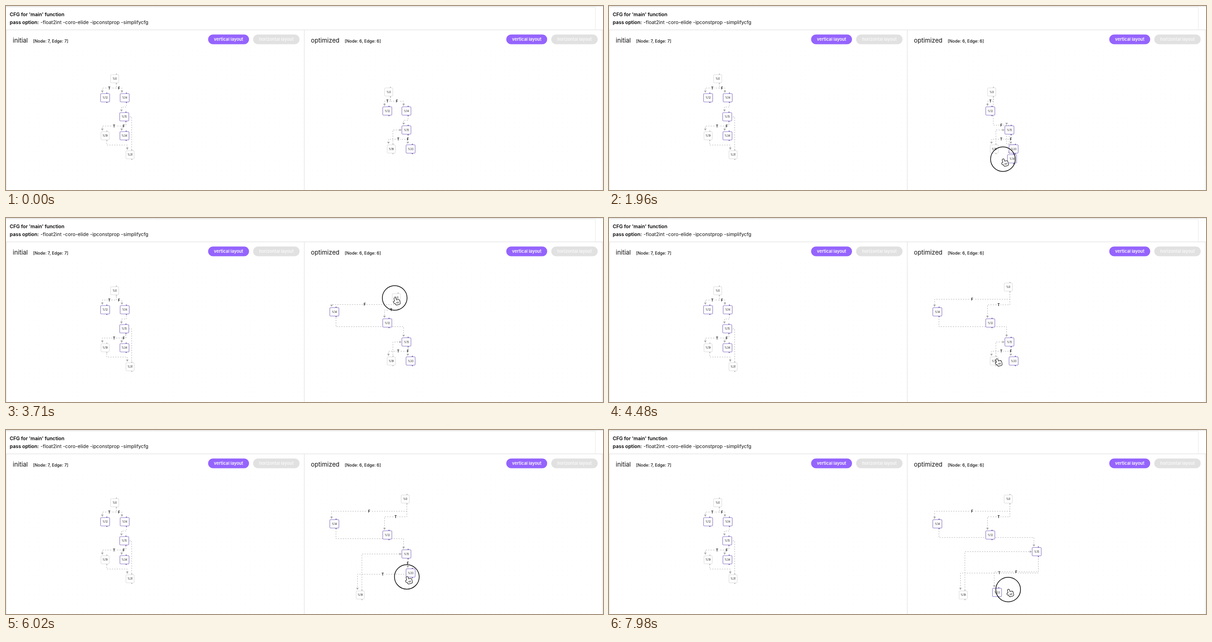
Animation of 1280x397 px, one loop 8 s. Source, as an HTML page with a canvas:

```html
<!DOCTYPE html>
<html lang="en">
<head>
<meta charset="utf-8">
<title>Control flow graph</title>
<style>
html, body { margin: 0; width: 100%; height: 100%; overflow: hidden; background: #fff; }
canvas { display: block; width: 1280px; height: 397px; }
</style>
</head>
<body>
<canvas id="stage"></canvas>
<script>
const W = 1280, H = 397, LOOP = 8000, STEP = 70, LEAD = 35, TRAVEL = 500;
const FONT = 'Inter, Roboto, sans-serif';
const canvas = document.getElementById('stage');
const ctx = canvas.getContext('2d');
const dpr = window.devicePixelRatio || 1;
canvas.width = W * dpr;
canvas.height = H * dpr;

const initial = {
  home: { 0: [233, 157], 12: [212.5, 198], 14: [254.5, 198], 15: [253.5, 239],
    19: [212.5, 280], 34: [254, 280], 31: [266, 321] },
  edges: [[0, 12, 'T'], [0, 14, 'F'], [14, 15], [15, 19, 'T'], [15, 34, 'F'], [19, 31], [31, 15, 'back']],
  drags: []
};

// Each drag takes a node along its path; grip is where the pointer holds it
const optimized = {
  home: { 0: [820.5, 185.5], 12: [817.5, 226.5], 14: [858.5, 226.5], 15: [858.5, 267.5],
    19: [826, 308.5], 33: [867.5, 308.5] },
  edges: [[0, 12, 'T'], [0, 14, 'F'], [14, 15], [15, 19, 'T'], [15, 33, 'F'], [19, 15, 'back']],
  drags: [
    { id: 14, from: 1190, to: 2989, grip: [2, -3],
      path: [[930, 170], [1015, 175], [863.5, 330], [715, 280], [708, 236], [706.5, 220], [704, 202.5]] },
    { id: 0, from: 3430, to: 3990, grip: [-6, 3], path: [[837, 172], [856, 149]] },
    { id: 19, from: 5040, to: 5460, grip: [5, -4], path: [[774, 341], [759.5, 356]] },
    { id: 33, from: 6020, to: 6370, grip: [0, 0], path: [[815, 363], [821.5, 355]] },
    { id: 15, from: 6550, to: 6690, grip: [11, 0], path: [[880, 247.5]] },
    { id: 15, from: 6860, to: 7070, grip: [4, 0], path: [[917, 262.5]] },
    { id: 33, from: 7560, to: 8120, grip: [8, -3], path: [[812, 357], [803, 354], [832, 350.5], [900, 336]] }
  ]
};
const litIds = [12, 14, 15, 33, 34];

const clamp = u => Math.max(0, Math.min(1, u));
const smooth = u => u * u * (3 - 2 * u);
const mix = (a, b, u) => a.map((v, i) => v + (b[i] - v) * u);
const add = (a, b) => a.map((v, i) => v + b[i]);

// Catmull-Rom curve through points spaced evenly in time
function along(points, u) {
  const last = points.length - 1;
  const i = Math.min(Math.floor(u * last), last - 1);
  const f = u * last - i;
  const at = k => points[Math.max(0, Math.min(last, k))];
  const [p, a, b, n] = [at(i - 1), at(i), at(i + 1), at(i + 2)];
  return a.map((v, k) => v + (b[k] - p[k]) / 2 * f
    + (p[k] - 2.5 * v + 2 * b[k] - n[k] / 2) * f * f
    + (1.5 * (v - b[k]) + (n[k] - p[k]) / 2) * f * f * f);
}

function place({ home, drags }, id, t) {
  return drags.filter(d => d.id === +id && t >= d.from).reduce(
    (pos, d) => along([pos, ...d.path], clamp((t - d.from) / (d.to - d.from))), home[id]);
}

function pointerAt(t) {
  const held = (d, time) => add(place(optimized, d.id, time), d.grip);
  const { drags } = optimized;
  const next = drags.findIndex(d => t < d.to);
  const drag = drags[next], before = drags[next - 1];
  if (t >= drag.from) return held(drag, t + LEAD);
  const start = before ? held(before, before.to) : [930, 400];
  const leave = before ? before.to : 420;
  const travel = Math.min(TRAVEL, drag.from - leave);
  return mix(start, held(drag, drag.from), smooth(clamp((t - leave) / travel)));
}

function text(str, x, y, size, weight = 400, color = '#111', align = 'left') {
  ctx.font = `${weight} ${size}px ${FONT}`;
  ctx.fillStyle = color;
  ctx.textAlign = align;
  ctx.fillText(str, x, y);
}

function line(points, color, width = 1) {
  ctx.strokeStyle = color;
  ctx.lineWidth = width;
  ctx.beginPath();
  points.forEach(([x, y]) => ctx.lineTo(x, y));
  ctx.stroke();
}

function shape(points, fill) {
  ctx.beginPath();
  points.forEach(([x, y]) => ctx.lineTo(x, y));
  ctx.fillStyle = fill;
  ctx.fill();
}

function pill(x, width, label, fill, color) {
  ctx.fillStyle = fill;
  ctx.beginPath();
  ctx.roundRect(x, 61.4, width, 21.2, 10.6);
  ctx.fill();
  text(label, x + width / 2, 75.2, 9.2, 600, color, 'center');
}

function drawPanel(x, title, info, infoX) {
  text(title, x + 14.5, 79, 13.2, 400);
  text(info, infoX, 79, 8.95, 500);
  pill(x + 433.3, 87.8, 'vertical layout', '#9564fd', '#fff');
  pill(x + 529.8, 99.6, 'horizontal layout', '#e1e1e1', '#f9f9f9');
}

function drawPage() {
  ctx.fillStyle = '#fff';
  ctx.fillRect(0, 0, W, H);
  ctx.fillStyle = '#f5f5f5';
  for (let y = 97; y < H; y += 10.3) {
    for (let x = 8; x < 1276; x += 10.3) ctx.fillRect(Math.round(x), Math.round(y), 1, 1);
  }
  line([[0, 0.5], [W, 0.5]], '#d5d5d5');
  line([[0, 2.5], [1263.5, 2.5], [1263.5, 51]], '#e8e8e8');
  line([[0, 51.5], [W, 51.5]], '#dedede');
  [0.5, 639.5, 1278.5].forEach(x => line([[x, 51], [x, H]], '#dedede'));
  text("CFG for 'main' function", 8, 22, 10.45, 600, '#000');
  text('pass option:', 8, 38.5, 10.5, 600, '#000');
  text('-float2int -coro-elide -ipconstprop -simplifycfg', 74, 38.5, 10.4);
  drawPanel(0, 'initial', '[Node: 7, Edge: 7]', 58);
  drawPanel(639.3, 'optimized', '[Node: 6, Edge: 6]', 726.3);
}

function drawEdge(from, to, kind, t) {
  const back = kind === 'back';
  const sx = from[0] + 3.5, sy = from[1] + 10;
  const tx = to[0] - (back ? 10.5 : 6), ty = to[1] - (back ? 0 : 11);
  const my = (sy + ty) / 2;
  ctx.setLineDash([2.6, 2.6]);
  ctx.lineDashOffset = -5.2 * (t % 500) / 500;
  line(back ? [[sx, sy], [sx, ty], [tx, ty]] : [[sx, sy], [sx, my], [tx, my], [tx, ty]], '#b4b4b4');
  ctx.setLineDash([]);
  const dir = Math.sign(tx - sx) * 4.5;
  shape(back ? [[tx, ty], [tx - dir, ty - 2.5], [tx - dir, ty + 2.5]]
    : [[tx, ty], [tx - 2.7, ty - 4.5], [tx + 2.7, ty - 4.5]], '#a9a9a9');
  if (!kind || back) return;
  const lx = (sx + tx) / 2;
  ctx.fillStyle = '#fff';
  ctx.fillRect(lx - 4, my - 4.5, 8, 9);
  text(kind, lx, my + 2.7, 7.3, 700, '#111', 'center');
}

function drawNode(id, [x, y]) {
  const lit = litIds.includes(+id);
  const w = lit ? 19.5 : 17.5, h = lit ? 18 : 17.5;
  ctx.fillStyle = lit ? '#6657a5' : '#b5b5b5';
  [-11, 9.2].forEach(dy => ctx.fillRect(x + 2.5, y + dy, 2.4, 1.8));
  ctx.beginPath();
  ctx.roundRect(x - w / 2, y - h / 2, w, h, 1.8);
  ctx.fillStyle = '#fff';
  ctx.fill();
  ctx.strokeStyle = lit ? '#8d78c4' : '#dcdcdc';
  ctx.lineWidth = 1.1;
  ctx.stroke();
  text('%' + id, x, y + 2, 5.5, 400, '#111', 'center');
}

function drawGraph(graph, t) {
  const pose = {};
  for (const id in graph.home) pose[id] = place(graph, id, t);
  graph.edges.forEach(([a, b, kind]) => drawEdge(pose[a], pose[b], kind, t));
  Object.keys(pose).forEach(id => drawNode(id, pose[id]));
  return Object.values(pose);
}

function drawHand() {
  ctx.rotate(-0.25);
  const hand = new Path2D();
  hand.roundRect(-1.5, 0, 3.6, 10, 1.8);
  hand.roundRect(-4.5, 7, 5, 4, 2);
  hand.roundRect(-1.5, 5.5, 10, 10, 3);
  ctx.strokeStyle = '#111';
  ctx.lineWidth = 2;
  ctx.stroke(hand);
  ctx.fillStyle = '#fff';
  ctx.fill(hand);
  [1.5, 3.5, 5.5].forEach(x => line([[x, 9.5], [x, 13]], '#222', 0.8));
}

function drawArrow() {
  const outline = [[0.5, 0], [0.5, 12], [3.2, 9.6], [5, 13.6], [7, 12.7], [5.3, 8.8], [8.8, 8.6], [0.5, 0]];
  line(outline, '#fff', 1.6);
  shape(outline, '#111');
}

function drawPointer(t, poses) {
  const [x, y] = pointerAt(t);
  const drag = optimized.drags.find(d => t >= d.from - STEP && t < d.to + STEP);
  const held = drag && t < drag.to;
  const over = poses.some(p => Math.abs(p[0] - x) < 10 && Math.abs(p[1] - y) < 9.5);
  ctx.save();
  ctx.translate(x, y);
  if (drag) {
    const grow = held ? clamp((t - drag.from + STEP) / STEP) : 0;
    ctx.beginPath();
    ctx.arc(0, 0, 18.5 + 8 * grow, 0, Math.PI * 2);
    ctx.strokeStyle = '#111';
    ctx.lineWidth = 1.5;
    ctx.stroke();
  }
  if (held || over) drawHand(); else drawArrow();
  ctx.restore();
}

function render(now) {
  const t = Math.floor(((now + 1) % LOOP) / STEP) * STEP;
  ctx.setTransform(dpr, 0, 0, dpr, 0, 0);
  drawPage();
  drawGraph(initial, t);
  drawPointer(t, drawGraph(optimized, t));
}

let start;
function tick(now) {
  start ??= now;
  render(now - start);
  requestAnimationFrame(tick);
}
render(0);
requestAnimationFrame(tick);
</script>
</body>
</html>
```
